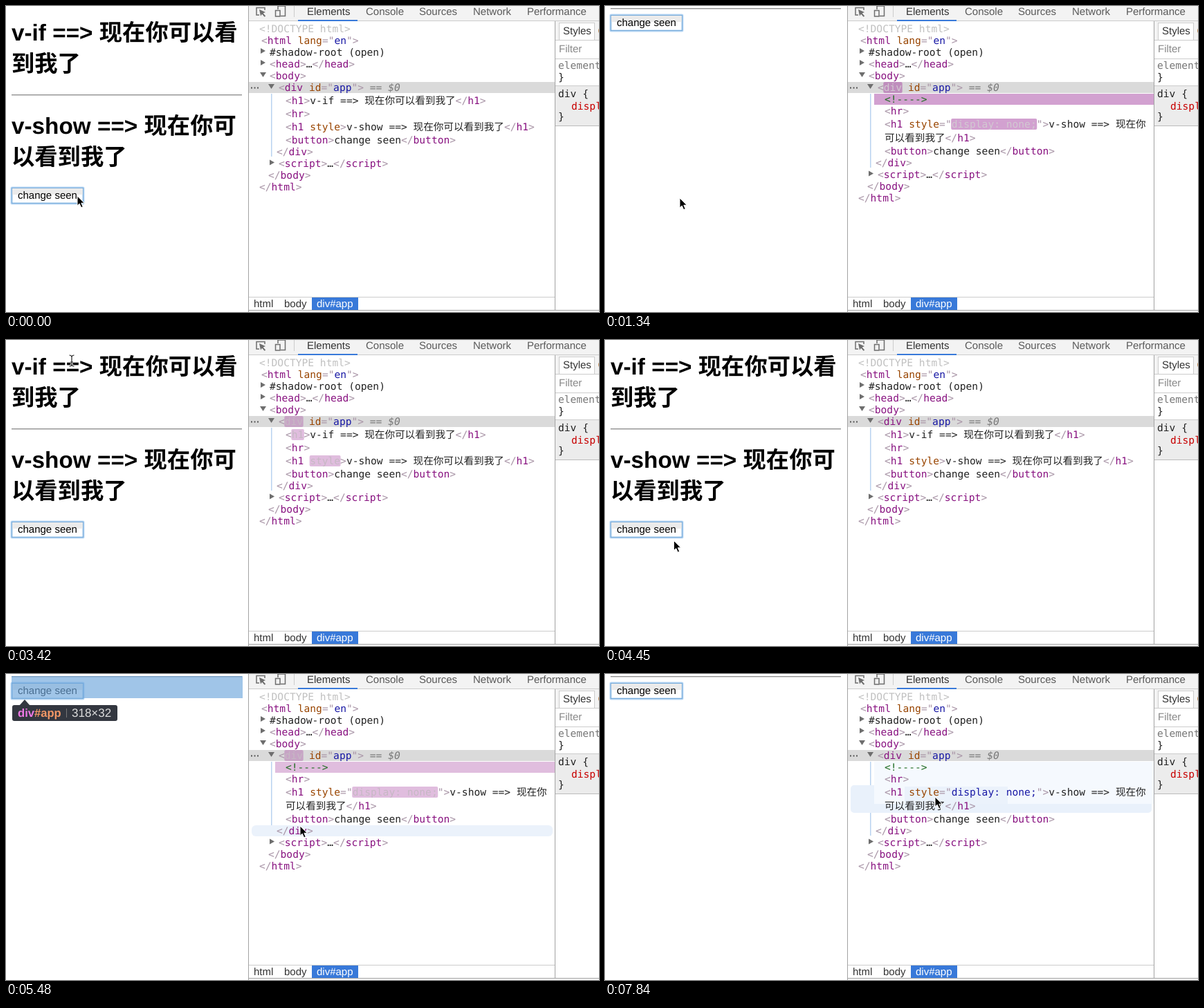
Recreate the animation shown at these times as an HTML page. Size 857x443 px, loop 7.99 s.

```html
<!DOCTYPE html>
<html lang="zh-CN">
<head>
<meta charset="utf-8">
<title>v-if / v-show</title>
<style>
html, body { margin: 0; width: 100%; height: 100%; overflow: hidden; background: #fff; }
svg { display: block; width: 857px; height: 443px; }
text {
  white-space: pre; text-rendering: geometricPrecision; fill: #333;
  font: 15px "Liberation Sans", "Noto Sans CJK SC", "Noto Sans CJK JP", sans-serif;
}
.title { font-size: 33.3px; font-weight: bold; fill: #000; }
.code { font: 14.6px "DejaVu Sans Mono", "Noto Sans CJK SC", "Noto Sans CJK JP", monospace; }
.tab { fill: #5a5a5a; }
.p { fill: #a894a6; } .t { fill: #881280; } .n { fill: #994500; } .v { fill: #1a1aa6; }
.d { fill: #c0c0c0; } .c { fill: #236e25; } .x { fill: #222; } .r { fill: #c80000; }
.g { fill: #777; } .i { fill: #777; font-style: italic; }
.glow { fill: #a33e9e; opacity: var(--glow); }
.flashing .flash { fill: var(--ink); }
.caret { fill: #6e6e6e; }
.rule { fill: #a3a3a3; }
.icon { fill: none; stroke: #6e6e6e; stroke-width: 1.5; }
</style>
</head>
<body>
<svg id="stage" viewBox="0 0 857 443"></svg>
<script>
const LOOP = 7990, TICK = 148, CHAR = 8.79;
const FLASH_TICKS = 9.6;
const toggles = [7, 20, 34];

// tick, x, y of the pointer's hot spot
const path = [
  [0, 103, 275], [2, 104, 277], [4, 107, 283], [6, 108, 280], [8, 108, 278], [10, 108, 278],
  [13, 104, 150], [16, 97, 44], [18, 95, 30], [24, 95, 30], [26, 96, 110], [29, 100, 301],
  [31, 99, 280], [33, 99, 275], [34, 99, 275], [35, 190, 265], [36, 330, 243], [37, 425, 220],
  [38, 427, 221], [39, 430, 182], [41, 432, 169], [44, 432, 168], [48, 437, 171],
  [50, 500, 180], [51, 558, 184], [52, 520, 182], [53, 477, 178]
];

const esc = s => s.replace(/&/g, '&amp;').replace(/</g, '&lt;');
const rect = (x, y, w, h, attrs = '') => `<rect x="${x}" y="${y}" width="${w}" height="${h}" ${attrs}/>`;
const text = (x, y, s, cls = '') => `<text x="${x}" y="${y}" class="${cls}">${esc(s)}</text>`;
const right = (x, y) => `<path class="caret" d="M${x} ${y - 4}l7 4l-7 4z"/>`;
const down = (x, y) => `<path class="caret" d="M${x} ${y - 4}h9l-4.5 7z"/>`;
const tag = name => `p<|t${name}|p>`;
const end = name => `p</|t${name}|p>`;

// Segments split by "|" start with their style letter; a capital letter also flashes.
function code(x, y, src) {
  let column = 0, glows = '', spans = '';
  for (const part of src.split('|')) {
    const kind = part[0].toLowerCase(), body = part.slice(1), flash = kind !== part[0];
    if (flash) glows += rect(x + column * CHAR - .5, y - 13, body.length * CHAR + 1, 16, 'rx="2" class="glow"');
    spans += `<tspan class="${kind}${flash ? ' flash' : ''}">${esc(body)}</tspan>`;
    column += body.length;
  }
  return `${glows}<text x="${x}" y="${y}" class="code">${spans}</text>`;
}

const page = `
  <g id="titles">
    ${text(8, 50, 'v-if ==> 现在你可以看', 'title')}${text(8, 95, '到我了', 'title')}
    ${text(8, 185, 'v-show ==> 现在你可', 'title')}${text(8, 230, '以看到我了', 'title')}
  </g>
  <g id="hr">${rect(8, 128, 333, 1, 'fill="#929292"')}${rect(8, 129, 333, 1, 'fill="#d2d2d2"')}</g>
  <g id="button">
    ${rect(8, 263, 104, 23, 'rx="1" fill="#fff" stroke="#b5d5f3" stroke-width="3"')}
    ${rect(9, 264, 102, 9, 'fill="#ebebeb"')}
    ${rect(8.5, 263.5, 103, 22, 'fill="none" stroke="#78abd9"')}
    <text x="17" y="279" style="fill:#000">change seen</text>
  </g>
  <g id="overlay">
    ${rect(8, 3, 334, 32, 'fill="#6fa8dc" opacity=".66"')}
    <path d="M19 46l8-9l8 9z" fill="#333740"/>
    ${rect(9, 45, 152, 23, 'rx="3" fill="#333740"')}
    <text x="17" y="62" style="font-size:16.6px;font-weight:bold;fill:#ee78e6">div<tspan fill="#f29766">#app</tspan></text>
    ${rect(87, 50, 1, 13, 'fill="#777"')}
    <text x="95" y="62" style="font-size:17px;fill:#ddd">318×32</text>
  </g>`;

const toolbar = `
  ${rect(351, 0, 506, 21, 'fill="#f3f3f3"')}${rect(351, 21, 506, 1, 'fill="#ccc"')}
  <path class="icon" d="M374 6V2.5H362V13H366"/>
  <path fill="#6e6e6e" d="M366 5l9 4-3.4 1.4 3.6 4-1.6 1.4-3.6-4-2 2.6z"/>
  <path class="icon" d="M393 5V0H403.500V14.500H397M389.500 6.500H396V15H389.500z"/>
  ${rect(416, 0, 1, 16, 'fill="#ccc"')}${rect(422, 20, 86, 2, 'fill="#3879d9"')}
  ${text(435, 13, 'Elements')}
  ${[[520, 'Console'], [597, 'Sources'], [675, 'Network'], [753, 'Performance']]
    .map(([x, name]) => text(x, 13, name, 'tab')).join('')}`;

const tree = `
  ${rect(351, 110, 442, 16, 'fill="#dadada"')}
  <rect id="guide" x="383" y="127" width="1.500" height="91" fill="#b9d3f0"/>
  <g id="rowEnd">${rect(355, 219, 435, 16, 'rx="6" fill="#ebf2fb"')}</g>
  <g id="rowTitle">
    ${rect(355, 161, 435, 40, 'rx="5" fill="#e9f1fb"')}
    ${rect(389, 127, 404, 61, 'fill="#f5f9fe"')}
    <rect id="patch" x="433" y="163" width="132" height="25" fill="#ebf2fb"/>
  </g>
  ${code(366, 38, 'd<!DOCTYPE html>')}
  ${code(369, 55, 'p<|thtml|p |nlang|p="|ven|p">')}
  ${right(368, 65)}${code(381, 72, 'x#shadow-root (open)')}
  ${right(368, 82)}${code(381, 89, `${tag('head')}|x…|${end('head')}`)}
  ${down(367, 100)}${code(381, 106, tag('body'))}
  <path d="M354 118.500h2m2.500 0h2m2.500 0h2" stroke="#555" stroke-width="2"/>
  ${down(379, 117)}${code(394, 123, 'p<|Tdiv|p |nid|p="|vapp|p">|g == |i$0')}
  <g id="shown">
    ${code(404, 142, `p<|Th1|p>|xv-if ==> 现在你可以看到我了|${end('h1')}`)}
    ${code(404, 161, tag('hr'))}
    ${code(404, 180, `p<|th1|p |Nstyle|p>|xv-show ==> 现在你可以看到我了|${end('h1')}`)}
  </g>
  <g id="hidden">
    ${rect(389, 127, 404, 16, 'class="glow"')}
    ${code(404, 140, 'c<!---->')}
    ${code(404, 157, tag('hr'))}
    ${code(404, 176, 'p<|th1|p |nstyle|p="|Vdisplay: none;|p">|xv-show ==> 现在你')}
    ${code(404, 196, `x可以看到我了|${end('h1')}`)}
  </g>
  <g id="tail">
    ${code(404, 199, `${tag('button')}|xchange seen|${end('button')}`)}
    ${code(391, 216, end('div'))}
    ${right(381, 226.5)}${code(394, 233, `${tag('script')}|x…|${end('script')}`)}
    ${code(379, 250, end('body'))}
    ${code(366, 267, end('html'))}
  </g>`;

const sidebar = `
  ${rect(794, 22, 63, 27, 'fill="#f3f3f3"')}
  ${rect(799.5, 24.5, 51, 25, 'fill="#fff" stroke="#ccc"')}${rect(794, 49, 63, 1, 'fill="#ccc"')}
  ${text(805, 41, 'Styles')}<text x="855.500" y="41" style="fill:#b06a20">Computed</text>
  <text x="799" y="67" style="fill:#888">Filter</text>${rect(794, 76, 63, 1, 'fill="#ccc"')}
  ${code(798, 91, 'gelement.style {')}${code(798, 108, 'x}')}
  ${rect(794, 116, 63, 58, 'fill="#ececec"')}
  ${rect(794, 115, 63, 1, 'fill="#ccc"')}${rect(794, 173, 63, 1, 'fill="#bbb"')}
  ${code(798, 132, 'xdiv {')}${code(817, 150, 'rdisplay: block;')}${code(798, 165, 'x}')}
  ${rect(793, 22, 1, 418, 'class="rule"')}`;

const crumbs = `
  ${rect(351, 421, 442, 1, 'fill="#ccc"')}${rect(442, 422, 67, 18, 'fill="#3879d9"')}
  ${text(358, 436, 'html')}${text(402, 436, 'body')}
  <text x="449" y="436" style="fill:#fff">div#app</text>
  ${rect(351, 440, 506, 1, 'class="rule"')}${rect(351, 441, 506, 2, 'fill="#f5f5f5"')}
  ${rect(350, 0, 1, 443, 'class="rule"')}`;

const pointer = `
  <path id="arrow" d="M0 0V14.200L3.200 11.200L5.700 16.800L8.200 15.700L5.800 10.300H10.200z"
    fill="#000" stroke="#fff" stroke-width="1" stroke-linejoin="round"/>
  <g id="beam" fill="none">
    <path d="M-3.500 -8Q0 -8 0 -5V5Q0 8 -3.500 8M3.500 -8Q0 -8 0 -5M0 5Q0 8 3.500 8M-2 2H2" stroke="#fff" stroke-width="3"/>
    <path d="M-3.500 -8Q0 -8 0 -5V5Q0 8 -3.500 8M3.500 -8Q0 -8 0 -5M0 5Q0 8 3.500 8M-2 2H2" stroke="#222" stroke-width="1.200"/>
  </g>`;

const stage = document.getElementById('stage');
stage.innerHTML = page + toolbar + tree + sidebar + crumbs + pointer;
const $ = id => document.getElementById(id);
const show = (id, on) => { $(id).style.display = on ? '' : 'none'; };
const move = (id, x, y) => $(id).setAttribute('transform', `translate(${x} ${y})`);
const mix = (a, b, f) => a + (b - a) * f;

function pointerAt(tick) {
  const i = Math.max(1, path.findIndex(key => key[0] >= tick));
  const [t0, x0, y0] = path[i - 1], [t1, x1, y1] = path[i];
  const f = (tick - t0) / (t1 - t0);
  return [mix(x0, x1, f), mix(y0, y1, f)];
}

// Progress of cubic-bezier(0, 0, .2, 1)
function easeOut(x) {
  let lo = 0, hi = 1;
  for (let i = 0; i < 20; i++) {
    const s = (lo + hi) / 2;
    if (s * s * (.6 + .4 * s) < x) lo = s; else hi = s;
  }
  return lo * lo * (3 - 2 * lo);
}

function draw(ms) {
  const tick = Math.min(53, Math.floor((ms + 8) / TICK));
  const past = toggles.filter(t => t <= tick);
  const visible = past.length % 2 === 0;
  const age = past.length ? (tick - past[past.length - 1]) / FLASH_TICKS : 1;
  const done = age < 1 ? easeOut(age) : 1;

  stage.classList.toggle('flashing', done < 1);
  stage.style.setProperty('--glow', 1 - done);
  stage.style.setProperty('--ink', `rgb(${[168, 148, 166].map(c => mix(255, c, done)).join(',')})`);

  show('titles', visible);
  show('shown', visible);
  show('hidden', !visible);
  move('hr', 0, visible ? 0 : -125);
  move('button', 0, visible ? 0 : -250);
  move('tail', 0, visible ? 0 : 16);
  $('guide').setAttribute('height', visible ? 91 : 107);

  const onEnd = tick === 37 || tick === 38;
  show('overlay', onEnd);
  show('rowEnd', onEnd);
  show('rowTitle', tick >= 39);
  $('patch').setAttribute('width', tick >= 51 ? 149 : 132);

  const [x, y] = pointerAt(tick);
  const overText = visible && y < 232 && x < 340;
  show('arrow', !overText);
  show('beam', overText);
  move('arrow', x, y);
  move('beam', x, y);
}

const start = performance.now();
function frame() {
  draw((performance.now() - start) % LOOP);
  requestAnimationFrame(frame);
}
frame();
</script>
</body>
</html>
```
